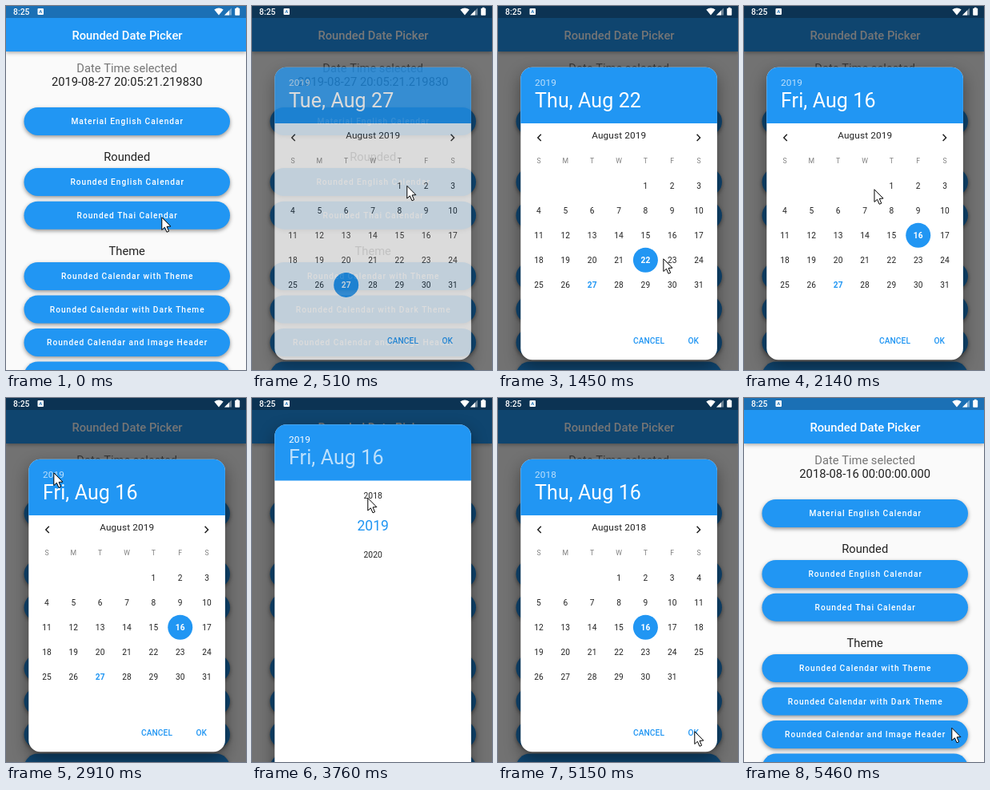
Write an HTML page with a canvas that moves like this. It is 300 px wide and 456 px high and loops after 6090 ms.

```html
<!DOCTYPE html>
<html lang="en">
<head>
<meta charset="utf-8">
<title>Rounded Date Picker</title>
<style>
html, body { margin: 0; width: 100%; height: 100%; overflow: hidden; background: #fafafa; }
canvas { display: block; width: 300px; height: 456px; }
</style>
</head>
<body>
<canvas id="stage"></canvas>
<script>
const W = 300, H = 456, LOOP = 6090;
const BLUE = '#2196f3', INK = 'rgba(0,0,0,.87)', MID = 151.2;
const dpr = window.devicePixelRatio || 1;

function layer(canvas) {
  canvas.width = W * dpr;
  canvas.height = H * dpr;
  const c = canvas.getContext('2d');
  c.scale(dpr, dpr);
  return c;
}
const screen = layer(document.getElementById('stage'));
const dialog = layer(document.createElement('canvas'));
let g = screen;

// Events in ms
const OPEN = 400, PICK_22 = 1200, PICK_16 = 1760, YEARS = 2960, PICK_2018 = 3990, CLOSE = 5210;
const FADE = 150;

// Cursor path: time, x, y
const PATH = [
  [0, 194.5, 264.5], [70, 194, 260], [270, 182, 214], [440, 182, 214], [510, 193.5, 225],
  [600, 193.5, 228], [1060, 186, 306], [1200, 187, 314], [1300, 190, 317], [1450, 206.5, 316.5],
  [1600, 215, 314], [1760, 215, 293], [1910, 215, 289], [2000, 215, 289], [2450, 48, 99],
  [2600, 57, 94], [2700, 59.5, 93.5], [3230, 59.5, 93.5], [3520, 152, 172], [3760, 144.5, 125],
  [4250, 144.5, 125], [4680, 234, 440], [4850, 237, 430], [5080, 245.5, 417.5],
  [5200, 245.5, 417.5], [5460, 259.5, 413], [LOOP, 259.5, 413]
];

const clamp = v => Math.max(0, Math.min(1, v));

function cursorAt(t) {
  let i = 1;
  while (PATH[i][0] < t) i++;
  const [t0, x0, y0] = PATH[i - 1], [t1, x1, y1] = PATH[i];
  const p = (t - t0) / (t1 - t0);
  return [x0 + (x1 - x0) * p, y0 + (y1 - y0) * p];
}

// Text placed by the middle of its capitals
function text(str, x, cy, size, color, { weight = 400, spacing = 0, align = 'center' } = {}) {
  g.font = `${weight} ${size}px Roboto, sans-serif`;
  g.letterSpacing = spacing + 'px';
  g.textAlign = align;
  g.fillStyle = color;
  g.fillText(str, x, cy + size * 0.355);
}

function shape(color, draw) {
  g.fillStyle = color;
  g.beginPath();
  draw();
  g.fill();
}

function poly(...pts) {
  for (let i = 0; i < pts.length; i += 2) g.lineTo(pts[i], pts[i + 1]);
  g.closePath();
}

function shadow(alpha, blur, dy, draw) {
  g.save();
  g.shadowColor = `rgba(0,0,0,${alpha})`;
  g.shadowBlur = blur * dpr;
  g.shadowOffsetY = dy * dpr;
  draw();
  g.restore();
}

function button(label, y) {
  shadow(0.42, 5, 2, () => shape(BLUE, () => g.roundRect(22.5, y, 257.5, 35, 17.5)));
  text(label, MID + 0.5, y + 17.5, 10.2, '#fff', { weight: 500, spacing: 0.95 });
}

function home(stamp) {
  g.fillStyle = '#fafafa';
  g.fillRect(0, 0, W, H);
  shadow(0.35, 5, 1.5, () => shape(BLUE, () => g.rect(0, 0, W, 57)));
  shape('#1b70b5', () => g.rect(0, 0, W, 15));
  text('Rounded Date Picker', MID + 0.3, 37, 14.75, '#fff', { weight: 500 });
  text('Date Time selected', MID, 78, 14.7, '#757575');
  text(stamp, MID, 95, 14.75, INK);
  button('Material English Calendar', 127);
  text('Rounded', MID, 189, 14.7, INK);
  button('Rounded English Calendar', 203);
  button('Rounded Thai Calendar', 244.7);
  text('Theme', MID, 307, 14.7, INK);
  button('Rounded Calendar with Theme', 321);
  button('Rounded Calendar with Dark Theme', 362.5);
  button('Rounded Calendar and Image Header', 404);
  button('', 445.5);
}

function statusBar() {
  const white = '#fff';
  text('8:25', 9, 7.2, 10.4, white, { weight: 500, align: 'left' });
  shape(white, () => g.roundRect(39.5, 3, 7.5, 8, 1));
  text('A', 43.2, 7, 6, '#1b70b5', { weight: 700 });
  shape(white, () => {
    g.moveTo(266, 11.5);
    g.lineTo(260.3, 4.6);
    g.quadraticCurveTo(266, 0.2, 271.7, 4.6);
    g.closePath();
  });
  shape('rgba(255,255,255,.4)', () => poly(273, 11.5, 282, 11.5, 282, 2.5));
  shape(white, () => poly(273, 11.5, 279, 11.5, 279, 5.5));
  shape(white, () => { g.rect(288, 1.8, 2.5, 1.5); g.roundRect(286.2, 2.8, 6, 9, 0.8); });
}

function chevron(x, dir) {
  g.strokeStyle = INK;
  g.lineWidth = 1.5;
  g.beginPath();
  g.moveTo(x - 2 * dir, 160.7);
  g.lineTo(x + 2 * dir, 164.9);
  g.lineTo(x - 2 * dir, 169.1);
  g.stroke();
}

function calendar(year, selected) {
  const first = new Date(year, 7, 1).getDay();
  const colX = c => 51 + c * 33.35;
  text('August ' + year, MID, 162, 11.8, INK, { spacing: 0.12 });
  chevron(51.8, -1);
  chevron(250.6, 1);
  [...'SMTWTFS'].forEach((d, c) => text(d, colX(c), 193.5, 8.7, 'rgba(0,0,0,.5)'));
  for (let d = 1; d <= 31; d++) {
    const cell = first + d - 1;
    const x = colX(cell % 7), y = 225 + Math.floor(cell / 7) * 31.1;
    const on = d === selected, today = d === 27 && year === 2019;
    if (on) shape(BLUE, () => g.arc(x, y, 15.5, 0, 7));
    text(d, x, y, 10.2, on ? '#fff' : today ? BLUE : INK,
      { weight: on || today ? 700 : 400, spacing: 0.1 });
  }
  text('CANCEL', 188.5, 419.5, 10.2, BLUE, { weight: 500, spacing: 0.1 });
  text('OK', 244.3, 419.5, 10.2, BLUE, { weight: 500, spacing: 0.1 });
}

function yearList() {
  text('2018', MID, 122.3, 10.4, INK);
  text('2019', MID, 159.3, 17.6, BLUE);
  text('2020', MID, 196.5, 10.4, INK);
}

function picker(t) {
  const choosing = t >= YEARS && t < PICK_2018;
  const year = t < PICK_2018 ? 2019 : 2018;
  const day = t < PICK_22 ? 27 : t < PICK_16 ? 22 : 16;
  const top = choosing ? 33.3 : 76.8;
  const weekday = ['Sun', 'Mon', 'Tue', 'Wed', 'Thu', 'Fri', 'Sat'][new Date(year, 7, day).getDay()];
  const dim = 'rgba(255,255,255,.7)';

  g.clearRect(0, 0, W, H);
  const card = () => g.roundRect(28.3, top, 245.6, 2 * (260 - top), 14.5);
  shadow(0.42, 20, 8, () => shape('#fff', card));
  shape(BLUE, () => g.roundRect(28.3, top, 245.6, 70.2, [14.5, 14.5, 0, 0]));
  text(year, 46, top + 18.6, 11.8, choosing ? '#fff' : dim, { spacing: 0.1, align: 'left' });
  text(`${weekday}, Aug ${day}`, 46, top + 41, 25, choosing ? dim : '#fff',
    { spacing: 0.1, align: 'left' });
  if (choosing) yearList();
  else calendar(year, day);
}

function cursor([x, y]) {
  g.save();
  g.translate(x, y);
  g.beginPath();
  poly(0.3, 0.3, 0.3, 16, 3.9, 12.8, 6.5, 18.8, 9.1, 17.7, 6.6, 11.9, 11.4, 11.6);
  g.fillStyle = '#fff';
  g.fill();
  g.strokeStyle = '#000';
  g.lineWidth = 1;
  g.stroke();
  g.restore();
}

function render(t) {
  const shown = t < CLOSE ? clamp((t - OPEN) / FADE) : 1 - clamp((t - CLOSE) / FADE);
  g = screen;
  home(t < CLOSE ? '2019-08-27 20:05:21.219830' : '2018-08-16 00:00:00.000');
  if (shown > 0) {
    const veil = 1 - (1 - shown) ** 3;
    shape(`rgba(0,0,0,${0.54 * veil})`, () => g.rect(0, 0, W, H));
    g = dialog;
    picker(t);
    g = screen;
    g.globalAlpha = shown;
    g.drawImage(dialog.canvas, 0, 0, W, H);
    g.globalAlpha = 1;
  }
  statusBar();
  cursor(cursorAt(t));
}

const start = performance.now();
function tick() {
  render((performance.now() - start) % LOOP);
  requestAnimationFrame(tick);
}
tick();
</script>
</body>
</html>
```
